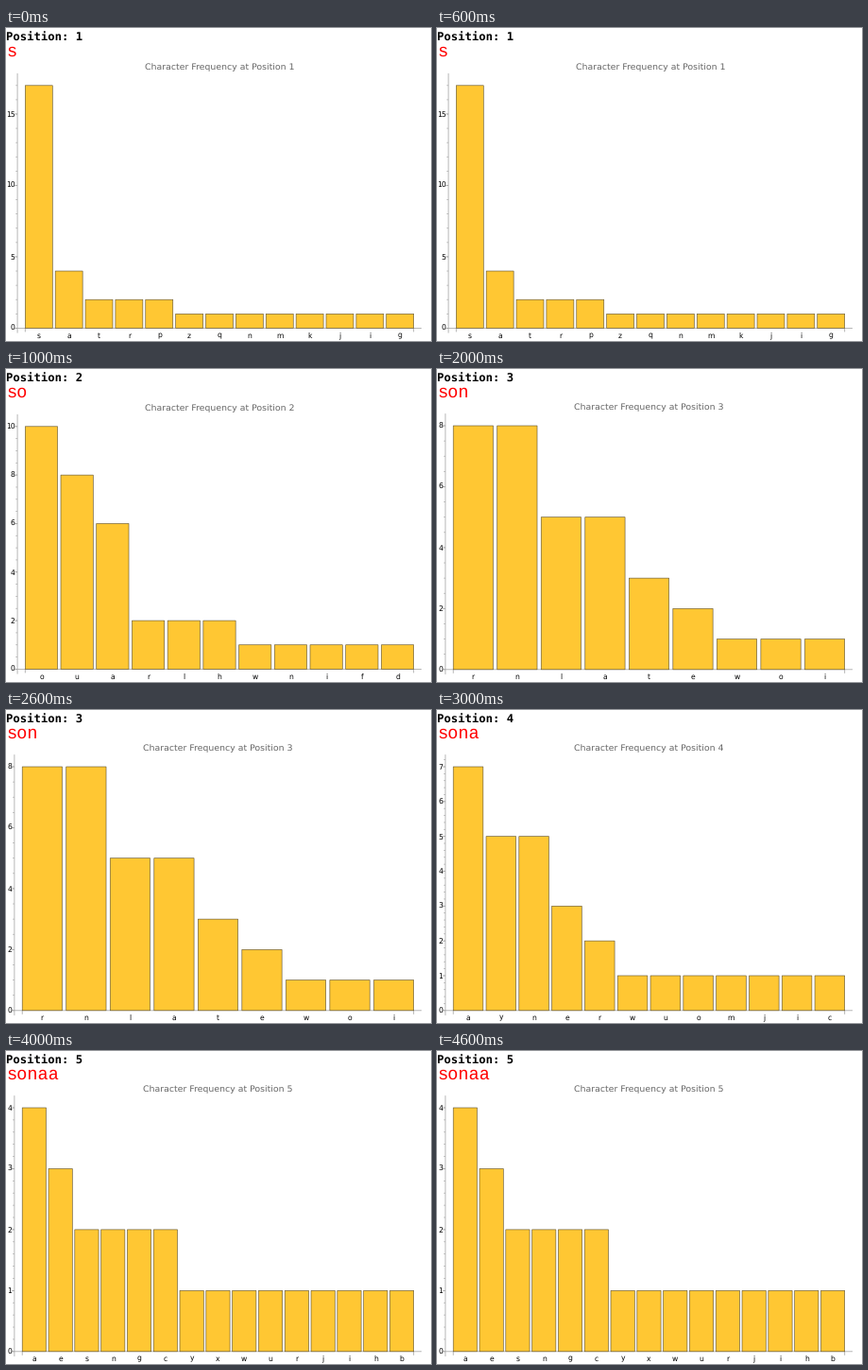
A matplotlib script for the animation above (5000 ms loop, 450 px wide and 331 px high).

```python
import matplotlib.pyplot as plt
import numpy as np
from matplotlib.animation import FuncAnimation
from matplotlib.patches import Rectangle

plt.rcParams["text.hinting"] = "none"

W, H, DPI = 450, 331, 100
PX = 72 / DPI  # points per pixel

WORD = "sonaa"
RIGHT = 431.7
BAR = "#ffc733"
EDGE = "#5c5030"
AXIS = "#a6a6a6"

# letters, counts, major step, minor step
CHARTS = [
    ("satrpzqnmkjig", [17, 4, 2, 2, 2] + [1] * 8, 5, 1),
    ("ouarlhwnifd", [10, 8, 6, 2, 2, 2] + [1] * 5, 2, 0.5),
    ("rnlatewoi", [8, 8, 5, 5, 3, 2, 1, 1, 1], 2, 0.5),
    ("aynerwuomjic", [7, 5, 5, 3, 2] + [1] * 7, 1, 0.2),
    ("aesngcyxwurjihb", [4, 3, 2, 2, 2, 2] + [1] * 9, 1, 0.2),
]

fig = plt.figure(figsize=(W / DPI, H / DPI), dpi=DPI, facecolor="white")
ax = fig.add_axes([0, 0, 1, 1])


def text(x, y, s, size, color="black", font="DejaVu Sans", **kw):
    ax.text(x, y, s, fontsize=size * PX, color=color, family=font,
            va="baseline", **kw)


def line(x0, y0, x1, y1, width=0.8):
    ax.plot([x0, x1], [y0, y1], color=AXIS, lw=width * PX,
            solid_capstyle="butt", snap=False)


def draw_axes(left, base, top, peak, major, minor):
    span_x, span_y = RIGHT - left, base - top
    x = left - 0.02 * span_x
    y_top = top - 0.05 * span_y
    line(x, base, RIGHT + 0.02 * span_x, base)
    line(x, base + 0.02 * span_y, x, y_top)
    for end in (left, RIGHT):
        line(end, base, end, base + 4)

    unit = span_y / peak
    for v in np.arange(0, (base - y_top) / unit, minor):
        y = base - v * unit
        line(x - 1.8, y, x, y, 0.7)
    for v in range(0, peak + 1, major):
        y = base - v * unit
        line(x - 2.8, y, x, y)
        text(x - 2.6, y + 2.8, str(v), 7.6, ha="right")


def draw_bars(left, base, top, letters, counts):
    n = len(counts)
    width = (RIGHT - left) / (n + 0.1 * (n - 1))
    unit = (base - top) / counts[0]
    for i, (letter, count) in enumerate(zip(letters, counts)):
        x = left + 1.1 * width * i
        ax.add_patch(Rectangle((x, base - count * unit), width, count * unit,
                               fc=BAR, ec=EDGE, lw=0.6 * PX, snap=False,
                               zorder=3))
        text(x + width / 2, 327.8, letter, 7.6, ha="center")


def draw(i):
    ax.clear()
    ax.set(xlim=(0, W), ylim=(H, 0))
    ax.axis("off")

    letters, counts, major, minor = CHARTS[i]
    # two-digit tick labels push the plot to the right
    wide = counts[0] >= 10
    left, base, top = (20.3, 317.4, 60.8) if wide else (17.2, 317.8, 60)

    text(0, 12.5, f"Position: {i + 1}", 12.2, font="DejaVu Sans Mono",
         weight="bold")
    text(0, 29.4, WORD[:i + 1], 18.6, "red", "Liberation Mono")
    text((left + RIGHT) / 2, 44.3 if wide else 43.3,
         f"Character Frequency at Position {i + 1}", 9.42, "#666666",
         ha="center")
    draw_axes(left, base, top, counts[0], major, minor)
    draw_bars(left, base, top, letters, counts)
    return []


anim = FuncAnimation(fig, draw, frames=len(CHARTS), init_func=lambda: [],
                     interval=1000, repeat=True, repeat_delay=0)
plt.show()
```
